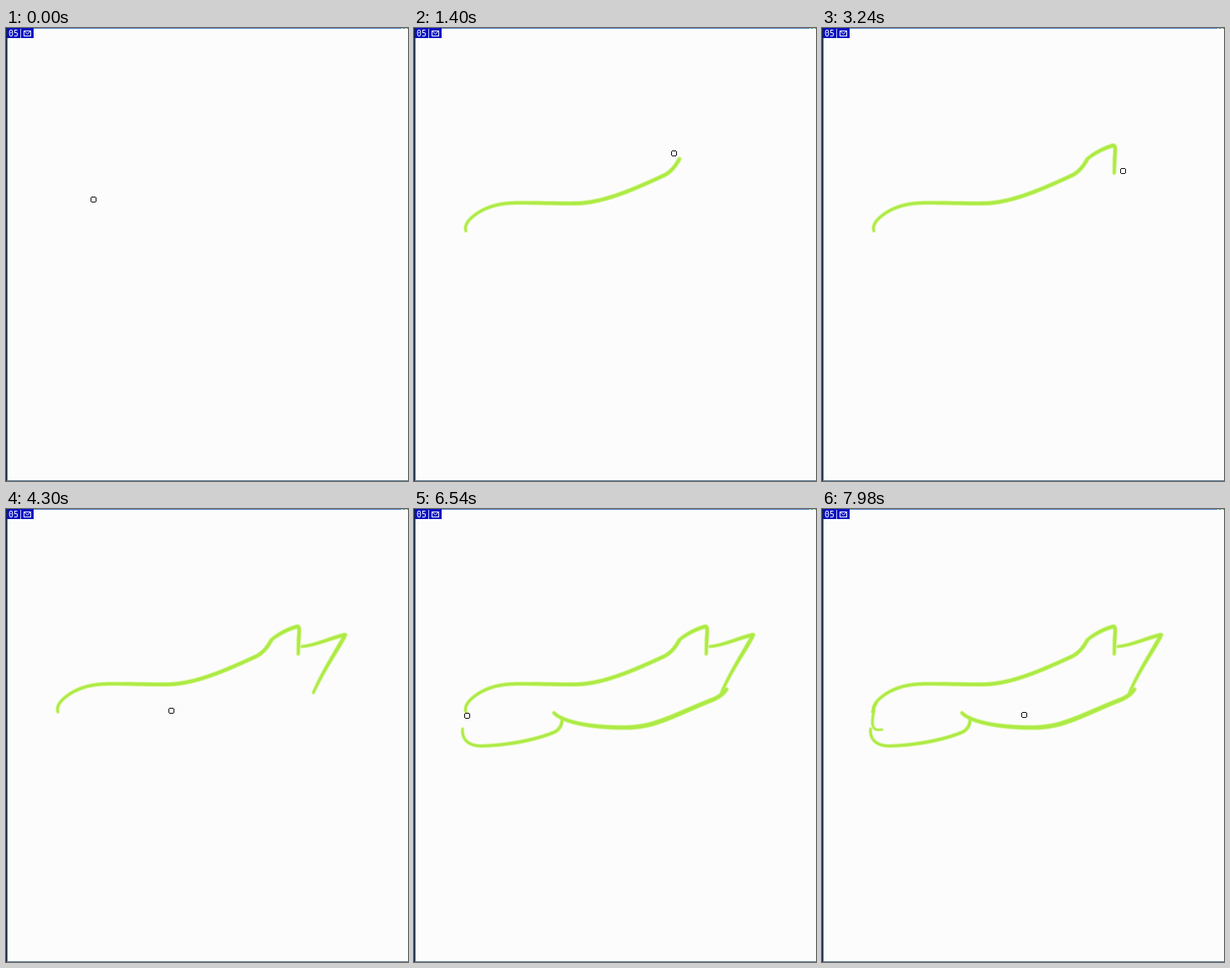
Recreate the animation shown at these times as an HTML page with a canvas. Size 480 px wide and 540 px high, loop 8 s.

```html
<!DOCTYPE html>
<html lang="en">
<head>
<meta charset="utf-8">
<title>Sketch</title>
<style>
  html, body { margin: 0; width: 100%; height: 100%; overflow: hidden; background: #fcfcfc; }
  canvas { display: block; }
</style>
</head>
<body>
<canvas id="stage" width="480" height="540"></canvas>
<script>
const ctx = document.getElementById('stage').getContext('2d');
const LOOP = 8000;

// Each move: start, end, path, and for ink the widths at start, middle and end.
const moves = [
  [20, 740, 'M104 204 C101 232 92 270 78 270 S65 252 64 241'],
  [860, 1310, 'M62 242 C60 236 64 230 70 225 C82 215 98 209 120 208.5 C145 208 172 209.5 195 209 C231 208 273 187 298 176 C308 171 313 163 317 156', [3, 4.2, 4]],
  [1310, 1400, 'M317 156 L310 149'],
  [1460, 1660, 'M310 149 C322 147 340 144 352 141'],
  [1700, 1960, 'M352 141 C338 146 325 150 317 156'],
  [1960, 2500, 'M317 156 C325 149 337 143 348 140', [3.4, 4, 4.2]],
  [2520, 2880, 'M348 140 C330 158 300 174 278 180 C305 172 334 154 349 140'],
  [2880, 3160, 'M348 140 C351 140 350 148 349.5 155 L349 173', [4, 4, 3.4]],
  [3160, 3240, 'M349 173 L359 170'],
  [3240, 3300, 'M359 170 L354 164'],
  [3340, 3820, 'M353 164 C372 162 389 153 405 150 C397 166 380 190 367 219', [3, 4.4, 3]],
  [3820, 4000, 'M367 219 C270 231 150 231 63 230'],
  [4000, 4140, 'M63 230 C100 231 140 231 172 231'],
  [4160, 4300, 'M172 231 L197 240'],
  [4300, 4400, 'M197 240 L168 244'],
  [4400, 4780, 'M167 243 C180 256 220 261 255 260.5 C268 260 280 258 291 254', [3.6, 4.4, 5]],
  [4780, 4870, 'M291 254 C305 242 320 222 331 209'],
  [4870, 4960, 'M331 209 C320 225 305 242 291 254'],
  [4980, 5240, 'M291 254 C310 248 334 236 355 228 C365 224 369 220 373 215', [5, 4.8, 4.4]],
  [5240, 5300, 'M373 215 L370 202'],
  [5300, 5460, 'M370 202 C340 240 270 260 207 252'],
  [5460, 5640, 'M207 252 C195 250 182 248 171 245'],
  [5640, 5780, 'M171 245 L178 252'],
  [5800, 5880, 'M178 252 L177 248'],
  [6020, 6480, 'M177 249 C177 257 174 264 165 267 C140 277 105 282 80 282.5 C63 282 57 273 58 262', [3.4, 3.6, 2.8]],
  [6480, 6540, 'M58 262 L63 246'],
  [6540, 6800, 'M63 246 C64 240 65 234 66 229'],
  [6880, 6920, 'M65 231 L61 237', [3, 3.2, 3]],
  [7080, 7160, 'M64 232 L60 242', [3, 3.2, 2.6]],
  [7320, 7480, 'M62 238 C61 248 58 258 63 262 C66 264 69 263 72 263', [3, 2.8, 2.2]],
  [7480, 7750, 'M72 263 C180 255 320 205 403 150'],
  [7750, 7980, 'M403 150 C360 200 300 235 241 245']
].map(([from, to, d, widths]) => ({ from, to, widths, points: sample(d) }));

function sample(d) {
  const path = document.createElementNS('http://www.w3.org/2000/svg', 'path');
  path.setAttribute('d', d);
  const length = path.getTotalLength();
  const count = Math.ceil(length);
  return Array.from({ length: count + 1 }, (_, i) => path.getPointAtLength(length * i / count));
}

function ease(u) {
  return u + (u * u * (3 - 2 * u) - u) * 0.5;
}

function progress(move, t) {
  return ease(Math.min(1, Math.max(0, (t - move.from) / (move.to - move.from))));
}

function widthAt([a, b, c], u) {
  return u < 0.5 ? a + (b - a) * u * 2 : b + (c - b) * (u * 2 - 1);
}

function drawInk(t, color, extra) {
  ctx.strokeStyle = color;
  ctx.lineCap = 'round';
  for (const move of moves) {
    if (!move.widths || t < move.from) continue;
    const { points, widths } = move;
    const last = Math.round(progress(move, t) * (points.length - 1));
    for (let i = 1; i <= last; i++) {
      ctx.lineWidth = widthAt(widths, i / (points.length - 1)) + extra;
      ctx.beginPath();
      ctx.moveTo(points[i - 1].x, points[i - 1].y);
      ctx.lineTo(points[i].x, points[i].y);
      ctx.stroke();
    }
  }
}

function box(color, x, y, w, h) {
  ctx.fillStyle = color;
  ctx.fillRect(x, y, w, h);
}

function drawCursor(t) {
  const move = moves.filter(m => m.from <= t).pop() || moves[0];
  const p = move.points[Math.round(progress(move, t) * (move.points.length - 1))];
  const x = Math.round(p.x), y = Math.round(p.y);
  box('#111', x - 2, y - 3, 5, 7);
  box('#111', x - 3, y - 2, 7, 5);
  box('#fcfcfc', x - 2, y - 2, 5, 5);
}

function drawFrame() {
  box('#5b88c6', 0, 0, 480, 1);
  box('#688399', 0, 539, 480, 1);
  box('#14243c', 0, 0, 1, 540);
  box('#60788f', 1, 1, 1, 538);
  box('#a8d6a0', 472, 0, 2, 1);
  box('#a8d6a0', 476, 0, 3, 1);

  box('#0810c4', 1, 0, 32, 12);
  box('#b8c0f4', 17, 1, 1, 11);
  ctx.fillStyle = '#fff';
  ctx.font = '10px "DejaVu Sans Mono", monospace';
  ctx.fillText('05', 3, 10);
  ctx.strokeStyle = '#e8ecff';
  ctx.lineWidth = 1;
  ctx.strokeRect(21.5, 3.5, 8, 6);
  ctx.beginPath();
  ctx.moveTo(22, 4);
  ctx.lineTo(25.5, 7);
  ctx.lineTo(29, 4);
  ctx.stroke();
}

function render(t) {
  box('#fcfcfc', 0, 0, 480, 540);
  drawInk(t, '#e2f9ba', 1.6);
  drawInk(t, '#c6f27a', 0.2);
  drawInk(t, '#aeea46', -1);
  drawFrame();
  drawCursor(t);
}

const start = performance.now();
function tick(now) {
  render(Math.max(0, now - start) % LOOP);
  requestAnimationFrame(tick);
}
render(0);
requestAnimationFrame(tick);
</script>
</body>
</html>
```
